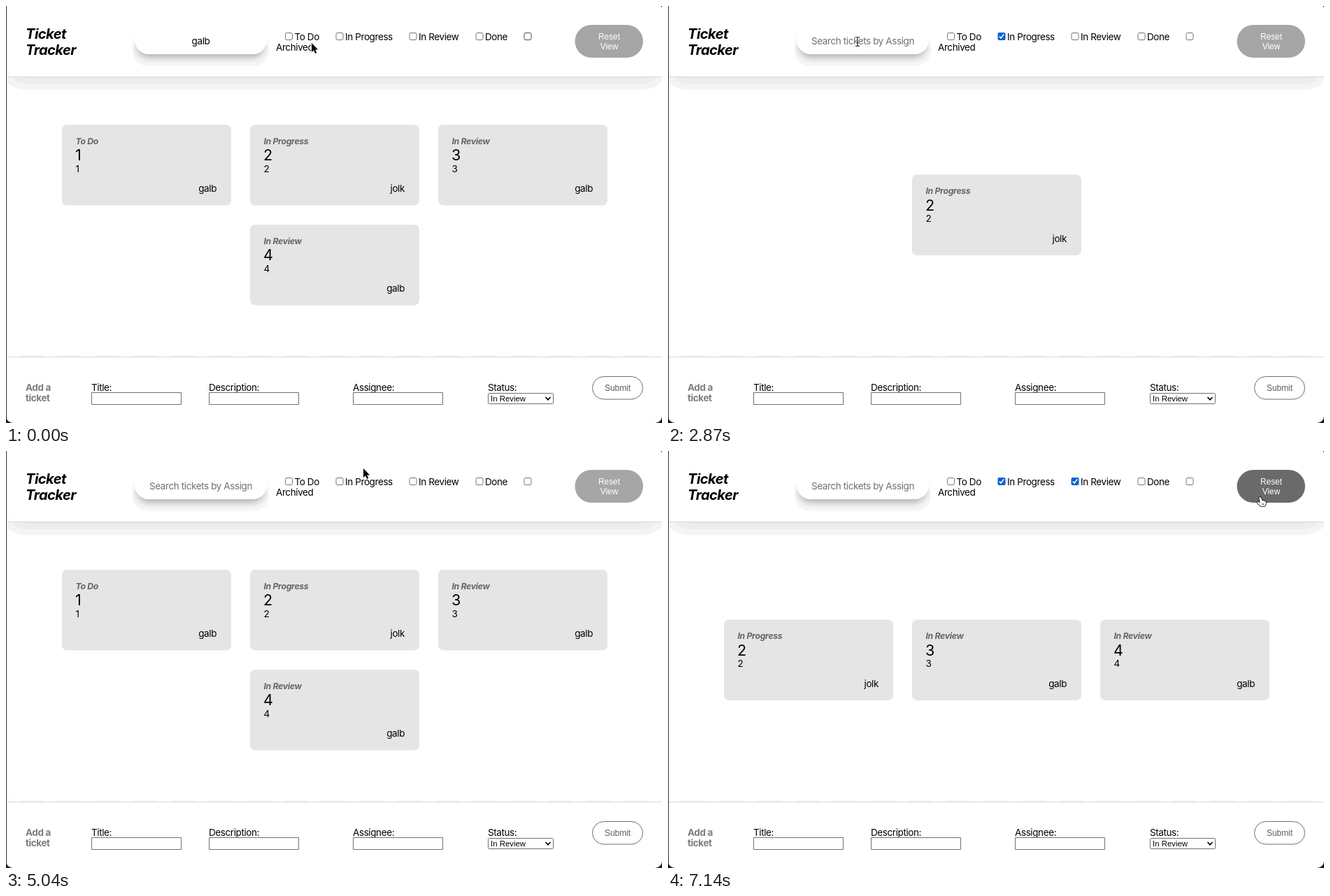
An HTML page with a canvas that plays this animation: 938 by 597 pixels, repeating every 7210 ms.

```html
<!DOCTYPE html>
<html lang="en">
<head>
<meta charset="utf-8">
<title>Ticket board</title>
<style>
  html, body { margin: 0; width: 100%; height: 100%; overflow: hidden; background: #fff; }
  canvas { display: block; }
</style>
</head>
<body>
<canvas id="stage" width="938" height="597"></canvas>
<script>
const W = 938, H = 597, LOOP = 7210, TICK = 70;
const ctx = document.getElementById('stage').getContext('2d');
const SANS = 'Inter, sans-serif', ARIAL = '"Liberation Sans", Arial, sans-serif';

// Font and letter spacing
const STYLE = {
  body: ['13.5px ' + SANS, -0.4],
  bold: ['bold 13.5px ' + SANS, -0.4],
  logo: ['italic bold 20.2px ' + SANS, -0.6],
  status: ['italic bold 12.3px ' + SANS, -0.35],
  big: ['21.5px ' + SANS, 0],
  button: ['11.9px ' + ARIAL, 0],
  select: ['11.4px ' + ARIAL, 0]
};

const TICKETS = [
  { status: 'To Do', owner: 'galb' },
  { status: 'In Progress', owner: 'jolk' },
  { status: 'In Review', owner: 'galb' },
  { status: 'In Review', owner: 'galb' }
].map((ticket, i) => ({ ...ticket, number: i + 1 }));

const FILTERS = [
  { label: 'To Do', x: 399 },
  { label: 'In Progress', x: 471.5 },
  { label: 'In Review', x: 576.5 },
  { label: 'Done', x: 671.5 },
  { label: '', x: 740.5 }
];
const ARCHIVED = 4;

// Each move eases from the previous stop to x, y; lift bows the path upward
const MOVES = [
  { from: 0, to: 0, x: 437, y: 53 },
  { from: 0, to: 280, x: 504, y: 51 },
  { from: 840, to: 1120, x: 504, y: 47, lift: 19 },
  { from: 1540, to: 1890, x: 325, y: 55 },
  { from: 2100, to: 2380, x: 271, y: 51, lift: -9 },
  { from: 3290, to: 3710, x: 577, y: 47 },
  { from: 3710, to: 4130, x: 582, y: 44 },
  { from: 4270, to: 4550, x: 505, y: 43 },
  { from: 4760, to: 5040, x: 511, y: 25 },
  { from: 5110, to: 5320, x: 533, y: 42 },
  { from: 5320, to: 5740, x: 598, y: 46 },
  { from: 6090, to: 6580, x: 850, y: 64 },
  { from: 7000, to: 7140, x: 847, y: 66 }
];

const within = (t, a, b) => t >= a && t < b;
const ease = k => k * k * (3 - 2 * k);

function pointerAt(t) {
  let { x, y } = MOVES[0];
  for (const m of MOVES.slice(1)) {
    if (t < m.from) break;
    const k = ease(Math.min(1, (t - m.from) / (m.to - m.from)));
    x += (m.x - x) * k;
    y += (m.y - y) * k - (m.lift || 0) * Math.sin(Math.PI * k);
  }
  return { x, y };
}

function stateAt(t) {
  const checked = [false, within(t, 770, 4550) || t >= 5250, t >= 5530, false, false];
  let shown = TICKETS;
  if (t >= 5950) shown = TICKETS.slice(1);
  else if (within(t, 1190, 4970) || t >= 5320) shown = [TICKETS[1]];
  return { checked, shown, selected: within(t, 2520, 2870), empty: t >= 2870 };
}

function text(str, x, y, style = 'body', color = '#000', align = 'left') {
  const [font, spacing] = STYLE[style];
  ctx.font = font;
  ctx.letterSpacing = spacing + 'px';
  ctx.textAlign = align;
  ctx.fillStyle = color;
  ctx.fillText(str, x, y);
}

function rect(x, y, w, h, r, fill, stroke) {
  ctx.beginPath();
  ctx.roundRect(x, y, w, h, r);
  if (fill) { ctx.fillStyle = fill; ctx.fill(); }
  if (stroke) { ctx.strokeStyle = stroke; ctx.lineWidth = 1; ctx.stroke(); }
}

function line(points, color, width) {
  ctx.beginPath();
  points.forEach(([x, y]) => ctx.lineTo(x, y));
  ctx.strokeStyle = color;
  ctx.lineWidth = width;
  ctx.stroke();
}

function header() {
  ['#f4f4f4', '#ededed', '#e8e8e8'].forEach((shade, i) => {
    const corner = { x: 30 - 6 * i, y: 16 - 4 * i };
    rect(1 + 8 * i, 60, W - 1 - 16 * i, 60 - 8 * i, [0, 0, corner, corner], shade);
  });
  rect(0, 0, W, 101, 0, '#fff');
  rect(0, 101, W, 1, 0, '#d9d9d9');
  text('Ticket', 28, 46.5, 'logo');
  text('Tracker', 28, 70, 'logo');
}

function search(state) {
  rect(181.5, 44, 194, 42, 21, '#f6f6f6');
  ctx.save();
  ctx.shadowColor = 'rgba(0,0,10,.27)';
  ctx.shadowBlur = 10;
  ctx.shadowOffsetY = 5;
  rect(187, 34, 182, 35, 17, '#fff');
  ctx.restore();
  rect(184, 24, 189, 45, 20, '#fff');
  if (state.selected) rect(265, 42, 28, 17, 0, '#b3d7ff');
  if (state.empty) text('Search tickets by Assign', 278.5, 54.5, 'body', '#707070', 'center');
  else text('galb', 278.5, 54.5, 'body', '#000', 'center');
}

function hoveredFilter({ x, y }) {
  if (within(x, 386, 440) && within(y, 51.5, 68)) return ARCHIVED;
  if (!within(y, 36, 54)) return -1;
  return FILTERS.findLastIndex(f => within(x, f.x, f.x + 82));
}

function filters(state, p) {
  const hot = hoveredFilter(p);
  FILTERS.forEach(({ label, x }, i) => {
    if (state.checked[i]) {
      rect(x, 38, 11, 11, 2, i === hot ? '#005cc8' : '#0b63ce');
      line([[x + 2.4, 43.6], [x + 4.6, 46], [x + 8.7, 40.4]], '#fff', 1.6);
    } else {
      rect(x + 0.5, 38.5, 10, 10, 2, '#fff', i === hot ? '#4f4f4f' : '#767676');
    }
    text(label, x + 13.5, 49);
  });
  text('Archived', 386, 64);
}

function resetButton(hot) {
  rect(813.5, 27, 97.5, 47, 23.5, hot ? '#6a6a6a' : '#a6a6a6');
  text('Reset', 862.5, 48, 'button', '#fff', 'center');
  text('View', 862.5, 61.5, 'button', '#fff', 'center');
}

function card({ status, number, owner }, x, y) {
  rect(x, y, 242, 115.5, 7, '#e5e5e5');
  text(status, x + 19.5, y + 28, 'status', '#666');
  text(number, x + 19, y + 51.5, 'big');
  text(number, x + 19.5, y + 68);
  text(owner, x + 221, y + 96.5, 'body', '#000', 'right');
}

// Rows of three, each row and the whole block centred
function board(shown) {
  const cols = 3, stepX = 269, stepY = 143;
  const rows = Math.ceil(shown.length / cols);
  shown.forEach((ticket, i) => {
    const row = Math.floor(i / cols);
    const inRow = Math.min(cols, shown.length - row * cols);
    const x = 349 + stepX * (i % cols - (inRow - 1) / 2);
    const y = 241.4 + stepY * (row - (rows - 1) / 2);
    card(ticket, x, y);
  });
}

function footer() {
  for (let x = 20; x < 920; x += 54) rect(x, 500, 34, 2, 0, '#f4f4f4');
  rect(0, 502, W, 1, 0, '#d9d9d9');
  text('Add a', 28, 551, 'bold', '#7d7d7d');
  text('ticket', 28, 566, 'bold', '#7d7d7d');
  [['Title:', 122], ['Description:', 290], ['Assignee:', 496]].forEach(([label, x]) => {
    text(label, x, 551);
    rect(x + 0.5, 553.5, 128, 17, 0, '#fff', '#707070');
  });
  text('Status:', 689, 551);
  rect(689.5, 554.5, 93, 15, 1, '#fff', '#707070');
  text('In Review', 693, 566, 'select');
  line([[771.5, 560], [775, 563.7], [778.5, 560]], '#000', 1.7);
  rect(838.5, 530.5, 72, 32.5, 16.25, '#fff', '#6e6e6e');
  text('Submit', 874.5, 551, 'button', '#5c5c5c', 'center');
}

function edges() {
  rect(0, 0, 1, H, 0, '#2c2c2c');
  ctx.beginPath();
  ctx.rect(0, 0, W, H);
  ctx.roundRect(0, 0, W, H, [0, 3, 10, 10]);
  ctx.fillStyle = '#1c1c22';
  ctx.fill('evenodd');
}

const ARROW = 'M0 0V13L3 10.3L5.2 15L7.2 14.1L5.1 9.6L9.2 9.4Z';
const HAND = 'M-1.6 1.4Q-1.2 -.4 .4 .2Q1.3 .6 1.6 2L2.4 5Q3.8 4.3 4.6 5.4Q6 4.8 6.7 6Q8 6 8 8L7.6 10.6L6.4 13H.6L-2.6 10.2L-4.6 8Q-4.6 6.3 -3 6.8L-.4 8.6Z';
const BEAM = 'M-3 -6.5Q0 -6.5 0 -5Q0 -6.5 3 -6.5M0 -5V5M-3 6.5Q0 6.5 0 5Q0 6.5 3 6.5M-1.5 2H1.5';

function trace(d, color, width) {
  ctx.strokeStyle = color;
  ctx.lineWidth = width;
  ctx.stroke(new Path2D(d));
}

function pointer(p, overButton) {
  ctx.save();
  ctx.translate(p.x, p.y);
  ctx.lineJoin = 'round';
  if (p.x < 374) {
    trace(BEAM, '#fff', 2.6);
    trace(BEAM, '#111', 1.1);
  } else if (overButton) {
    trace(HAND, '#000', 1.6);
    ctx.fillStyle = '#fff';
    ctx.fill(new Path2D(HAND));
    line([[2.6, 9], [2.6, 11.4]], '#000', 0.7);
    line([[4.6, 9], [4.6, 11.4]], '#000', 0.7);
  } else {
    trace(ARROW, '#fff', 1.8);
    ctx.fillStyle = '#000';
    ctx.fill(new Path2D(ARROW));
  }
  ctx.restore();
}

function draw(now) {
  const t = Math.floor((now % LOOP) / TICK) * TICK;
  const p = pointerAt(t), state = stateAt(t);
  const overButton = within(p.x, 814, 911) && within(p.y, 27, 74);
  rect(0, 0, W, H, 0, '#fff');
  header();
  search(state);
  filters(state, p);
  resetButton(overButton);
  board(state.shown);
  footer();
  edges();
  pointer(p, overButton);
}

let start;
function frame(now) {
  if (start === undefined) start = now;
  draw(now - start);
  requestAnimationFrame(frame);
}
draw(0);
requestAnimationFrame(frame);
</script>
</body>
</html>
```
